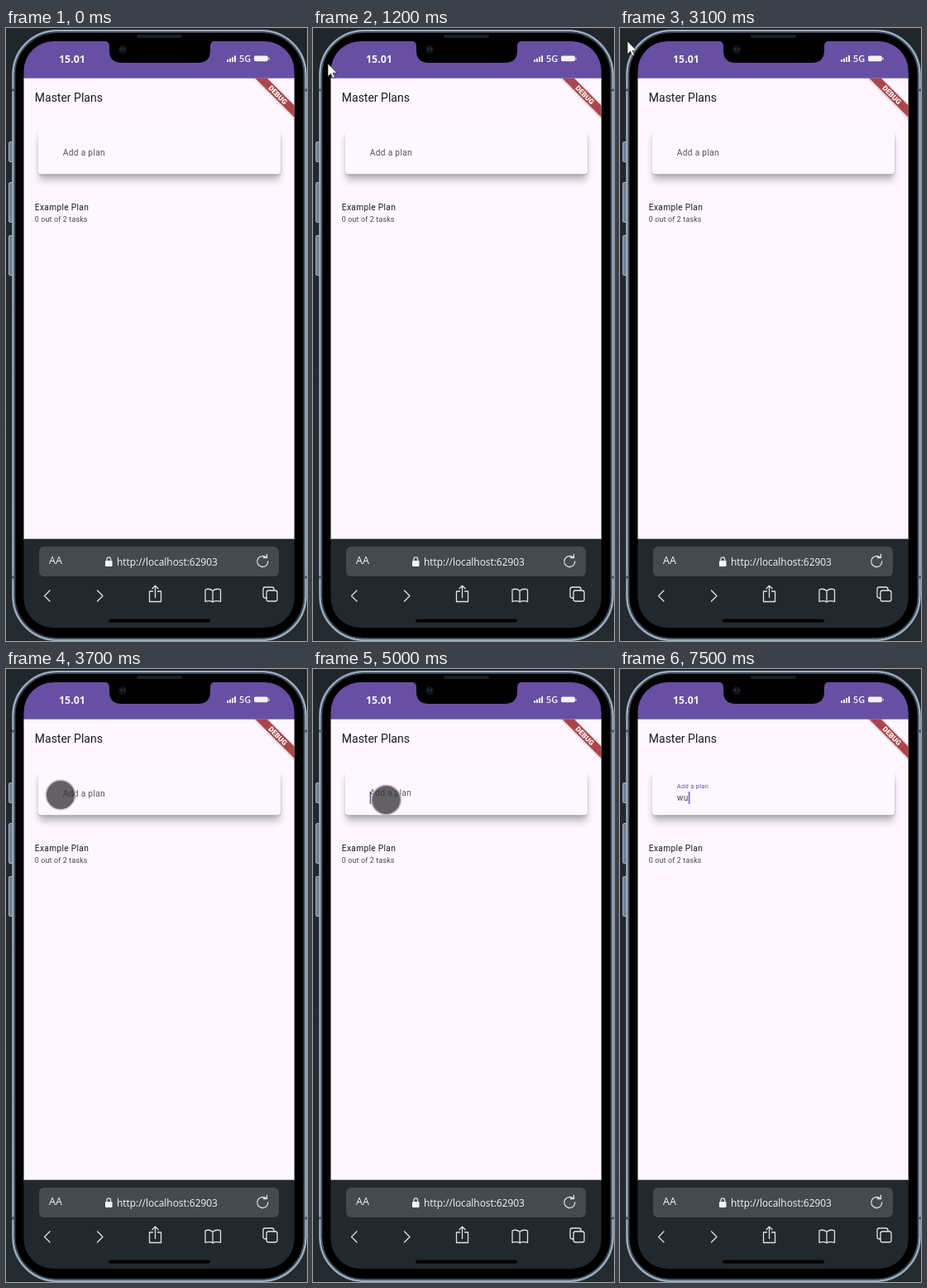
Recreate the animation shown at these times as an HTML page. Size 364 px wide and 740 px high, loop 8 s.

```html
<!DOCTYPE html>
<html lang="en">
<head>
<meta charset="utf-8">
<title>Master Plans</title>
<style>
  html, body { margin: 0; width: 100%; height: 100%; overflow: hidden; background: #20282e; }
  svg { display: block; width: 364px; height: 740px; }
  .ui { font-family: "Open Sans", "Noto Sans", sans-serif; fill: #f4f4f6; }
  .app { font-family: Roboto, sans-serif; fill: #1d1b20; }
  .body { font-size: 10.2px; letter-spacing: .32px; }
  .icon { fill: none; stroke: #e0e3e5; stroke-width: 1.3; stroke-linecap: round; stroke-linejoin: round; }

  .arrow, .touch, .label, .caret, .blink, .key { animation: 8s step-end infinite; }
  .arrow { animation-name: arrow; }
  .touch { animation-name: touch; }
  .label { animation-name: label; animation-timing-function: linear; }
  .caret { animation-name: caret; }
  .blink { animation-name: blink; }
  .key { fill: transparent; }
  .w { animation-name: typeW; }
  .u { animation-name: typeU; }

  @keyframes arrow {
    0% { opacity: 0; transform: translate(18px, 43px); }
    15% { opacity: 1; transform: translate(18px, 43px); }
    16.25% { opacity: 1; transform: translate(20px, 38px); }
    17.5% { opacity: 1; transform: translate(21px, 35px); }
    18.75% { opacity: 1; transform: translate(22px, 34px); }
    27.5% { opacity: 1; transform: translate(19px, 34px); }
    28.75% { opacity: 1; transform: translate(14px, 35px); }
    30% { opacity: 1; transform: translate(10px, 36px); }
    31.25% { opacity: 1; transform: translate(8px, 36px); }
    35% { opacity: 1; transform: translate(8px, 31px); }
    36.25% { opacity: 1; transform: translate(8px, 24px); }
    37.5% { opacity: 1; transform: translate(9px, 18px); }
    38.75% { opacity: 1; transform: translate(9px, 16px); }
    45%, 100% { opacity: 0; transform: translate(9px, 16px); }
  }
  @keyframes touch {
    0% { opacity: 0; transform: translate(44px, 100px); }
    45% { opacity: 1; transform: translate(44px, 100px); }
    46.25% { opacity: 1; transform: translate(66px, 152px); }
    47.5% { opacity: 1; transform: translate(77px, 178px); }
    48.75% { opacity: 1; transform: translate(80px, 185px); }
    52.5% { opacity: 1; transform: translate(82px, 183px); }
    53.75% { opacity: 1; transform: translate(79px, 173px); }
    55% { opacity: 1; transform: translate(85px, 162px); }
    56.25% { opacity: 1; transform: translate(88.5px, 158px); }
    90%, 100% { opacity: 0; transform: translate(88.5px, 158px); }
  }
  @keyframes label {
    0%, 62% { transform: translate(68.7px, 153.8px); fill: #57535c; animation-timing-function: ease-in-out; }
    64.6%, 100% { transform: translate(68.7px, 144.3px) scale(.75); fill: #6750a4; }
  }
  @keyframes blink {
    0% { opacity: 0; }
    62.5% { opacity: 1; }
    68.75% { opacity: 0; }
    75% { opacity: 1; }
    81.25% { opacity: 0; }
    87.5%, 100% { opacity: 1; }
  }
  @keyframes caret {
    0% { transform: none; }
    92.5% { transform: translateX(8px); }
    93.75%, 100% { transform: translateX(14.3px); }
  }
  @keyframes typeW {
    0% { fill: transparent; }
    92.5%, 100% { fill: #47434c; }
  }
  @keyframes typeU {
    0% { fill: transparent; }
    93.75%, 100% { fill: #47434c; }
  }
</style>
</head>
<body>
<svg viewBox="0 0 364 740">
  <defs>
    <linearGradient id="back" x2="0" y2="1">
      <stop offset="0" stop-color="#20262c"/>
      <stop offset="1" stop-color="#232b31"/>
    </linearGradient>
    <clipPath id="screen"><rect x="21.500" y="16" width="327.200" height="708" rx="36"/></clipPath>
    <clipPath id="page"><rect x="21.500" y="60.700" width="327.200" height="556"/></clipPath>
    <filter id="soft" x="-20%" y="-60%" width="140%" height="220%"><feGaussianBlur stdDeviation="4.5"/></filter>
    <filter id="tight" x="-20%" y="-60%" width="140%" height="220%"><feGaussianBlur stdDeviation="1.8"/></filter>
  </defs>

  <rect width="364" height="740" fill="url(#back)"/>

  <!-- phone body -->
  <g fill="#6f7f90" stroke="#a3b3c3">
    <rect x="3.500" y="137.500" width="5" height="24" rx="1.500"/>
    <rect x="3.500" y="186.500" width="5" height="48" rx="1.500"/>
    <rect x="3.500" y="250.500" width="5" height="48" rx="1.500"/>
  </g>
  <rect x="8.500" y="3.200" width="354" height="735.600" rx="53" fill="#000" stroke="#9aacbf" stroke-width="2.600"/>
  <rect x="10.600" y="5.300" width="349.800" height="731.400" rx="51" fill="none" stroke="#3f4b58" stroke-width="1.600"/>
  <path d="M7 75h4M7 663h4M360 75h4M360 663h4" stroke="#46525d" stroke-width="3"/>
  <rect x="158" y="8" width="55" height="4" rx="2" fill="#1b1e22"/>

  <g clip-path="url(#screen)">
    <rect x="21" y="16" width="329" height="46" fill="#674fa3"/>
    <rect x="21" y="60.700" width="329" height="557" fill="#fef7ff"/>
    <rect x="21" y="616.700" width="329" height="108" fill="#22292e"/>
  </g>

  <!-- notch and status bar -->
  <path d="M119 15.500Q125 16 125 22V27Q125 42 140 42H232Q247 42 247 27V22Q247 16 253 15.500Z" fill="#000"/>
  <circle cx="141" cy="26" r="5" fill="#11141a"/>
  <path d="M139.500 24v3M143 24v3" stroke="#39414d"/>
  <g class="ui" font-weight="700">
    <text x="64" y="42.300" font-size="12.400">15.01</text>
    <text x="282" y="41.300" font-size="11" font-weight="600">5G</text>
    <path d="M267 38h2v3h-2zM270 36.800h2v4.200h-2zM273 35h2v6h-2zM276 33.200h2v7.800h-2z"/>
    <rect x="300" y="33.500" width="16.800" height="6.800" rx="1.800"/>
    <rect x="317.400" y="35.500" width="1.300" height="3" rx=".6" opacity=".8"/>
  </g>

  <!-- app page -->
  <g class="app">
    <text x="34.800" y="88.800" font-size="14">Master Plans</text>
    <g clip-path="url(#page)">
      <g transform="translate(348.700 60.700) rotate(45)">
        <rect x="-45" y="23.500" width="90" height="10" opacity=".4" filter="url(#tight)"/>
        <rect x="-45" y="23.300" width="90" height="10" fill="#ac4549"/>
        <text y="31.400" font-size="8.700" font-weight="900" text-anchor="middle" fill="#fff">DEBUG</text>
      </g>
    </g>
    <rect x="40" y="132" width="291" height="52" rx="4" opacity=".27" filter="url(#soft)"/>
    <rect x="39" y="126" width="293" height="52" rx="4" opacity=".2" filter="url(#tight)"/>
    <rect x="38.700" y="124" width="293.300" height="52.300" rx="4" fill="#fdf7ff"/>
    <text class="label body">Add a plan</text>
    <text class="body" x="68.700" y="158.800"><tspan class="key w">w</tspan><tspan class="key u">u</tspan></text>
    <g class="blink"><rect class="caret" x="68.700" y="148" width="1.400" height="15" fill="#5c479b"/></g>
    <text class="body" x="34.800" y="219.800">Example Plan</text>
    <text x="34.800" y="233.600" font-size="8.900" letter-spacing=".16" fill="#49454f">0 out of 2 tasks</text>
  </g>

  <!-- browser bar -->
  <rect x="40" y="626" width="290" height="36" rx="6" fill="#434b50"/>
  <g class="ui">
    <text x="52" y="647" font-size="12.500">AA</text>
    <text x="134" y="648.500" font-size="11.900">http://localhost:62903</text>
    <rect x="120" y="643" width="8.500" height="7" rx="1"/>
  </g>
  <path class="icon" d="M121.900 643v-1.800a2.350 2.350 0 0 1 4.700 0v1.800"/>
  <g class="icon">
    <path d="M315 639.500A6.500 6.500 0 1 0 316.800 644M311.500 639.500H315.500V635.500"/>
    <path d="M53 679l-6.500 6.500 6.500 6.500M110.500 679l6.500 6.500-6.500 6.500"/>
    <path d="M177.500 680H173.500V692.500H187.500V680H183.500M180.500 687.500V673.500M177 676.700l3.500-3.500 3.500 3.500"/>
    <path d="M250 679.500Q246 676 241 678V692.500Q246 690.500 250 693Q254 690.500 259.500 692.500V678Q254 676 250 679.500V693"/>
    <rect x="315" y="679" width="13" height="13" rx="2.500"/>
    <path d="M315 688H313.500Q311 688 311 685.500V677.500Q311 675 313.500 675H321.500Q324 675 324 677.500V679"/>
  </g>
  <rect x="124" y="713.500" width="123" height="4" rx="2" fill="#000"/>

  <!-- pointers -->
  <g class="touch">
    <circle r="17.700" fill="#323232" fill-opacity=".76" stroke="#bfbbc0" stroke-width="1.500"/>
  </g>
  <g class="arrow">
    <path d="M0 0V15.500L3.600 12.200L6 17.500L8.400 16.400L6 11.300H11Z" fill="#fff" stroke="#222" stroke-width=".7"/>
  </g>
</svg>
</body>
</html>
```
